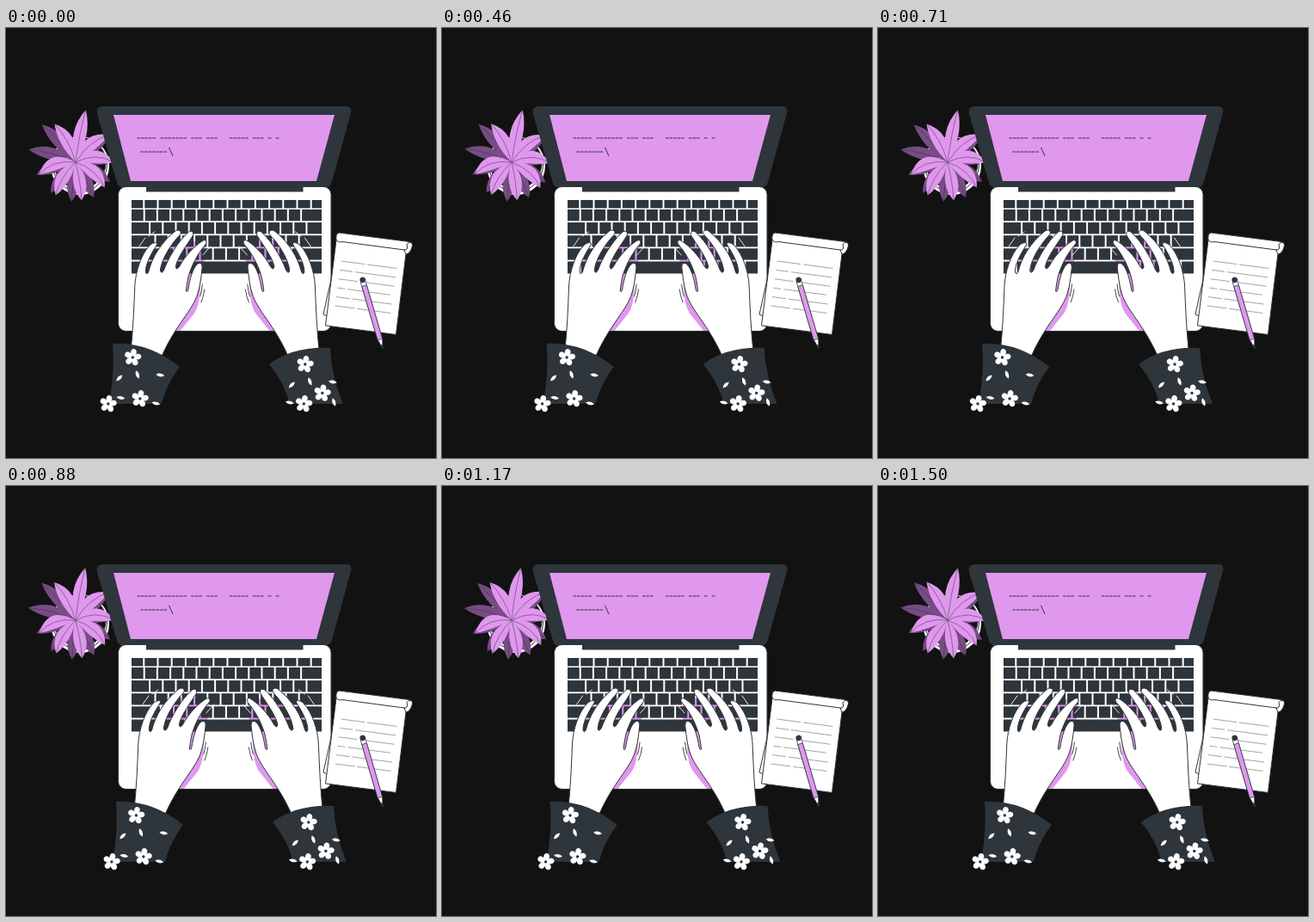
Animation, 500 px wide and 500 px high, one loop 1.54 s. Source, as an HTML page:

```html
<!DOCTYPE html>
<html lang="en">
<head>
<meta charset="utf-8">
<title>Typing on a laptop</title>
<style>
  html, body { margin: 0; width: 100%; height: 100%; overflow: hidden; background: #121212; }
  svg { display: block; width: 100%; height: 100%; }
  .ink { stroke: #2e353b; stroke-linejoin: round; stroke-linecap: round; }
  .line { fill: none; }
  .dark { fill: #2e353b; }
  .pink { fill: #e097ee; }
  .white { fill: #fff; }
</style>
</head>
<body>
<svg viewBox="0 0 500 500">
  <circle class="white" cx="86" cy="160" r="34"/>
  <circle class="ink line" cx="86" cy="159" r="31.5"/>
  <circle class="ink" cx="86" cy="157" r="30" fill="#121212"/>
  <g id="leaves"></g>

  <path class="dark" d="M112 91H395Q403 91 401 99L379 179Q377 186 370 186H137Q131 186 129 180L106 100Q104 92 112 91Z"/>
  <path class="pink" d="M125 101H382L361 178H145Z"/>
  <g class="line" stroke="#2e353b">
    <path id="dashes" stroke-dasharray="3.7 .78"/>
    <path d="M189.5 139L194 149"/>
  </g>

  <rect class="ink white" x="130.5" y="184.5" width="247.5" height="168" rx="9"/>
  <path class="dark" d="M163 184H345.5V190.5H163Z"/>
  <g class="moving pink" id="shadows"></g>
  <g id="keys" class="dark"></g>

  <g class="ink white">
    <path d="M379 288L369 333L378 337Z"/>
    <path d="M387 238L469 248.5Q474 250 472 255Q470 262 465 263L453.5 356.5L371.5 346L384 247Q383 239 387 238Z"/>
    <path class="line" d="M384 246Q386 250 391 248.5L463 258Q468 259 466 252Q468 248 472 250M463 258L465 263"/>
  </g>
  <g id="notes" class="line" stroke="#9a9a9a" stroke-width=".9"></g>
  <g class="ink" stroke-width=".7" transform="translate(414.5 292) rotate(-16.3)">
    <path class="white" d="M-2.7 3H2.7V73L0 84L-2.7 73Z"/>
    <path class="pink" d="M-2.7 8H2.7V73H-2.7Z"/>
    <circle class="dark" cy="1" r="3"/>
    <path class="dark" d="M-1 80H1L0 84Z"/>
  </g>

  <g class="moving">
    <g id="hands"></g>
    <path class="dark" d="M124 367Q166 365 202 394Q187 414 181 437H120Q127 397 124 367Z"/>
    <path class="dark" d="M306 391Q334 370 377 372Q379 406 392 437H330Q324 412 306 391Z"/>
    <g id="pattern" class="white"></g>
  </g>
</svg>
<script>
const $ = id => document.getElementById(id);
const repeat = (n, make) => Array.from({ length: n }, (_, i) => make(i));
const rad = deg => deg * Math.PI / 180;

// Leaves fan out around the centre; sideways ones arch up and droop
function leaf(fill, angle, length, width, droop) {
  const cx = 81, cy = 156, ux = Math.cos(rad(angle)), uy = Math.sin(rad(angle));
  const point = (along, off) => `${cx + ux * along - uy * off} ${cy + uy * along + ux * off}`;
  const tip = point(length, 0), bend = -droop * ux;
  const side = off => point(length * .55, bend + off);
  return `<path fill="${fill}" d="M${cx} ${cy}Q${side(width)} ${tip}Q${side(-width)} ${cx} ${cy}"/>
    <path class="ink line" stroke-width=".5" d="M${cx} ${cy}Q${side(0)} ${tip}"/>`;
}
const fan = (count, from, step, fill, length, extra, longest, width, droop) =>
  repeat(count, i => {
    const angle = from + i * step;
    const stretch = Math.max(0, Math.cos(rad(angle - longest))) ** 4;
    return leaf(fill, angle, length + extra * stretch, width, droop);
  }).join('');
$('leaves').innerHTML = fan(9, -36, 33, '#784c84', 46, 14, 215, 14, 5)
  + fan(8, -119, 40, '#e097ee', 45, 17, -79, 15, 13);

// Screen text made of hyphens on a fixed pitch
const hyphens = (x, y, text) => text.replace(/-+/g, (run, at) =>
  `M${x + at * 4.48} ${y}h${run.length * 4.48 - .7}`);
$('dashes').setAttribute('d',
  hyphens(152.5, 128, '----- ------- --- ---   ----- --- - -') + hyphens(156.5, 144, '-------'));

// Keyboard rows: the last key takes the remaining width
const BOARD = 223;
function keyRow(y, h, widths) {
  let x = 146;
  return [...widths, BOARD + 146].map(w => {
    const right = Math.min(x + w, 146 + BOARD);
    const key = `<rect x="${x}" y="${y}" width="${right - x - 2}" height="${h}"/>`;
    x = right;
    return key;
  }).join('');
}
const small = Array(4).fill(15.8);
$('keys').innerHTML = keyRow(200, 9.5, [15.3, ...Array(12).fill(16.2)])
  + repeat(4, i => keyRow(211 + i * 15.1, 13.3,
      [15.7 + i * 6.4, ...Array(Math.floor(12.7 - i * .7)).fill(15.2)])).join('')
  + keyRow(271.5, 14, [...small, BOARD - 8 * 15.8, ...small.slice(1)]);

// Notepad lines, each broken once
$('notes').innerHTML = repeat(6, i =>
  `<path stroke-dasharray="${28 - i * 13 % 20} 3 50" d="M${389.5 - i * 1.4} ${271 + i * 10.4}l65 8.5"/>`).join('');

// Hands mirror each other
const mirrored = art => art + `<g transform="translate(509.5 0) scale(-1 1)">${art}</g>`;
$('shadows').innerHTML = mirrored(
  `<path d="M226 292Q227 320 219 332L203 352H188L214 300Z"/>
   <path d="M166 272L188 247L214 245L232 255L231 270L224 290L212 306L170 285Z"/>`);
$('hands').innerHTML = mirrored(
  `<path class="ink white" d="M145 378C148 350 149 325 150 299C151 283 157 264 167 253
    C171 249 178 248 175 253C169 262 162 275 162.5 284Q164 288 166 283
    C170 267 180 250 196 237C200 233 206 236 202 241C193 250 181 268 179.5 282Q181 287 184 281
    C189 267 200 249 211 238.5C215 234 220 237 217 242C210 253 200 266 197.5 277Q198 283 202 277
    C209 264 219 254 228 248C232 245 235 248 232 252C223 262 215 278 212 290Q210 300 209.5 306
    Q211 308 212 304C214 291 217 281 222 275C227 271 229 275 228 281C227 290 226 300 223 309
    C218 327 197 346 182 380Z"/>
   <g class="line" stroke-linecap="round" stroke-width=".9">
     <path stroke="#fff" d="M155 254L162 244M166 242L173 237M229 264L238 254"/>
     <path stroke="#2e353b" d="M228.5 298Q228 305 226 312M231 304Q230 312 227 319"/>
   </g>`);

// Sleeve pattern: the upper part is the same on both sleeves
const flower = (x, y) => `<g transform="translate(${x} ${y})">`
  + repeat(5, i => `<path transform="rotate(${10 + i * 72})" d="M0 0C-5 -4 -4 -10 0 -10C4 -10 5 -4 0 0"/>`).join('')
  + '<circle class="dark" r="1.7"/></g>';
const fleck = (x, y, angle) =>
  `<path transform="translate(${x} ${y}) rotate(${angle})" d="M-5 0Q0 -4 5 0Q0 4 -5 0"/>`;
const upper = flower(147.5, 383) + fleck(132, 407, -45) + fleck(153, 403, 70) + fleck(179.5, 403.5, 8);
$('pattern').innerHTML = upper + `<g transform="translate(200.5 8)">${upper}</g>`
  + flower(156, 431) + flower(119, 437) + fleck(133.5, 430, 8) + fleck(174.5, 436.5, 12)
  + flower(368, 424.5) + flower(346.5, 437) + fleck(330, 435.5, 12) + fleck(381.5, 435, 72);

// Motion at 24 poses per second; the shake plays forwards, then back
const LOOP = 1540, CYCLE = 1500, STEP = 1000 / 24;
const shake = [0, -1, 2, -4, 4, -4];
const moving = document.querySelectorAll('.moving');

function draw(now) {
  const pose = Math.floor((now % LOOP + 5) / STEP) * STEP;
  const phase = (pose + 22) % CYCLE / CYCLE;
  const beat = 5 - Math.abs(phase * 10 - 5), i = Math.min(4, Math.floor(beat));
  const shift = shake[i] + (shake[i + 1] - shake[i]) * (beat - i);
  moving.forEach(el => el.setAttribute('transform', `translate(${shift} 0)`));
  $('leaves').setAttribute('transform', `rotate(${Math.sin(phase * 2 * Math.PI)} 81 156)`);
}

const start = performance.now();
function tick() {
  draw(performance.now() - start);
  requestAnimationFrame(tick);
}
tick();
</script>
</body>
</html>
```
